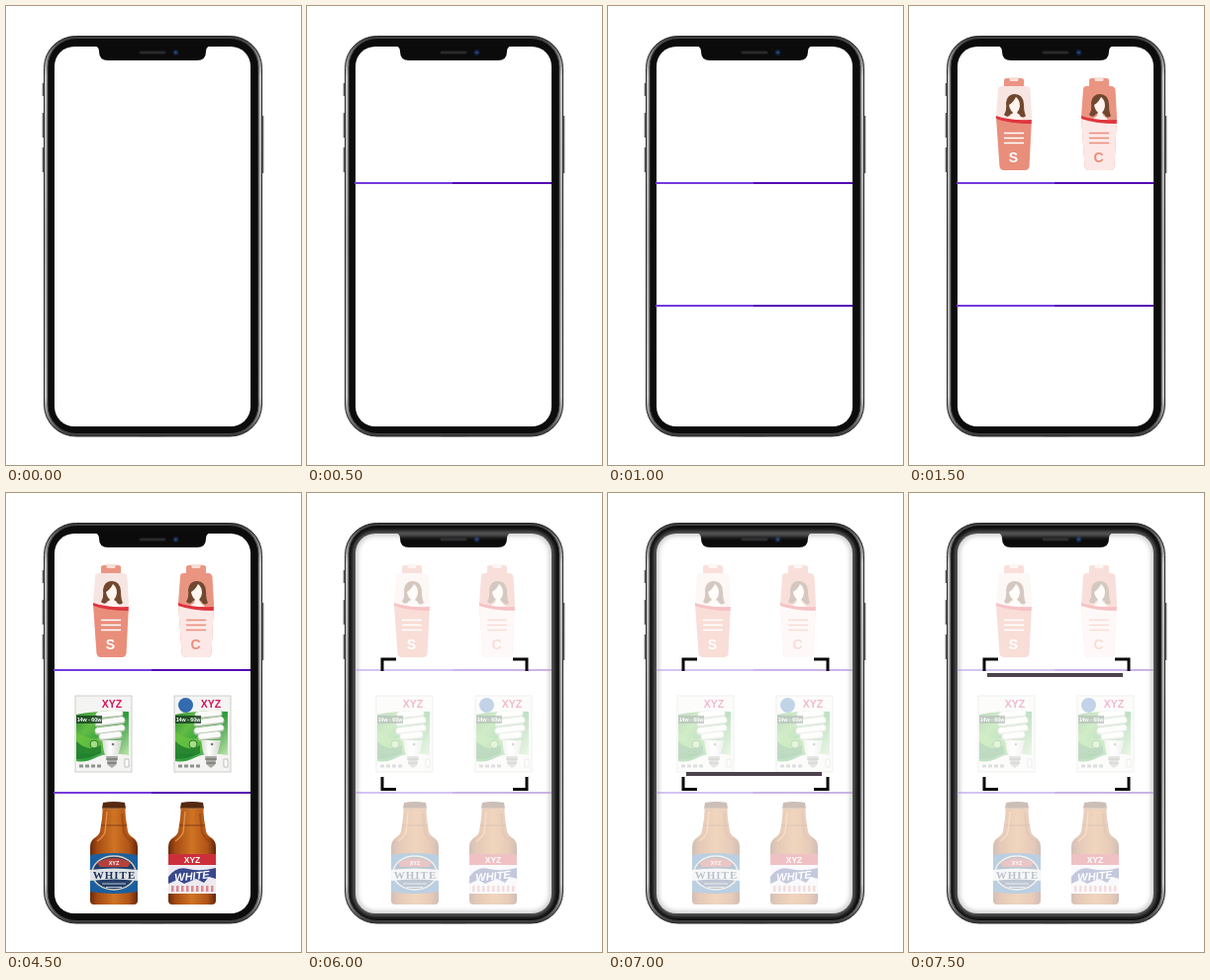
Write an HTML page that moves like this. It is 298x464 px and loops after 8 s.

```html
<!DOCTYPE html>
<html lang="en">
<head>
<meta charset="utf-8">
<style>
html, body { margin: 0; width: 100%; height: 100%; overflow: hidden; background: #fff; }
svg { display: block; width: 100vw; height: 100vh; }
text { font-family: "Liberation Sans", Arial, sans-serif; text-anchor: middle; }
.serif { font-family: "Liberation Serif", "Noto Serif", serif; font-weight: 700; }
</style>
</head>
<body>
<svg viewBox="0 0 298 464">
  <defs>
    <linearGradient id="rim" x2="0" y2="1">
      <stop stop-color="#333"/><stop offset=".04" stop-color="#777"/>
      <stop offset=".1" stop-color="#c4c4c4"/><stop offset=".5" stop-color="#aaa"/>
      <stop offset=".9" stop-color="#c4c4c4"/><stop offset=".96" stop-color="#777"/>
      <stop offset="1" stop-color="#333"/>
    </linearGradient>
    <linearGradient id="leaf" x2="1" y2=".8">
      <stop stop-color="#2f8a35"/><stop offset=".3" stop-color="#62bd45"/>
      <stop offset=".6" stop-color="#2c9a38"/><stop offset="1" stop-color="#b5dfa4"/>
    </linearGradient>
    <linearGradient id="glass">
      <stop stop-color="#6a2b0c"/><stop offset=".15" stop-color="#a54a12"/>
      <stop offset=".5" stop-color="#cf7424"/><stop offset=".82" stop-color="#b05316"/>
      <stop offset="1" stop-color="#64280b"/>
    </linearGradient>
    <linearGradient id="tube">
      <stop stop-color="#d5dccf"/><stop offset=".4" stop-color="#fff"/><stop offset="1" stop-color="#d0d5cb"/>
    </linearGradient>
    <filter id="soft" x="-10%" y="-10%" width="120%" height="120%"><feGaussianBlur stdDeviation="2.5"/></filter>
    <clipPath id="flask"><path d="M2 12Q2 9 6 9H30Q34 9 34.500 13L36 40L33.500 90Q33 94 29 94H8Q4 94 3.500 90L0 40Z"/></clipPath>
    <clipPath id="beerShape"><path id="beerPath" d="M13 3H35L36 17L38 30Q39 34 44 37Q48 40 48 46V100Q48 104 44 104H4Q0 104 0 100V46Q0 40 4 37Q9 34 10 30L12 17Z"/></clipPath>

    <g id="woman">
      <path d="M8 38Q11 33 10 26Q11 17 19 17Q27 17 28 27Q28 35 30 39Q26 43 23 37H15Q12 42 8 38Z" fill="#70482f"/>
      <path d="M13 28Q17 26 20 20Q24 23 24 29Q23 36 19 36Q14 35 13 28Z" fill="#fff5ee"/>
      <path d="M17 34H21L22 38L27 43H11L16 39Z" fill="#fff5ee"/>
    </g>

    <g id="bulb">
      <rect width="57" height="77" fill="#f4f4f2" stroke="#bbbcb8" stroke-width=".7"/>
      <path d="M1 19Q23 14 54 16V60Q34 56 22 62T1 66Z" fill="url(#leaf)"/>
      <path d="M1 36Q17 48 30 40V55Q15 62 1 57Z" fill="#69c440" opacity=".7"/>
      <path d="M1 46Q14 58 26 50V58Q13 64 1 64Z" fill="#1c7a2c" opacity=".8"/>
      <circle cx="19" cy="49" r="4" fill="#a9dc85" stroke="#287f31"/>
      <path d="M24 20L45 18M23 28L47 25M23 36L47 33M27 42L44 40" stroke="#b9c4b3" stroke-width="7" stroke-linecap="round"/>
      <path d="M24 19L45 17M23 27L47 24M23 35L47 32M27 41L44 39" stroke="#fbfcf9" stroke-width="5.500" stroke-linecap="round"/>
      <path d="M27 45H47L44 58Q42 61 36 61Q30 61 29 57Z" fill="url(#tube)"/>
      <path d="M31 61H43L41 70L37 73L33 70Z" fill="#a9aaa5"/>
      <path d="M31 64H43M32 68H42" stroke="#62655f" stroke-width="1.200"/>
      <circle cx="38" cy="49" r="1.300" fill="#777"/>
      <rect x="1" y="20" width="26" height="8" fill="#173d20" opacity=".8"/>
      <text x="14" y="26" font-size="5.300" font-weight="700" fill="#fff">14w - 60w</text>
      <path d="M4 71H27" stroke="#8b938d" stroke-width="3" stroke-dasharray="4 2"/>
      <path d="M50 64H54V72H50Z" fill="#fff" stroke="#a4aba5" stroke-width=".7"/>
      <text x="37" y="12" font-size="10.500" font-weight="700" fill="#d2145c">XYZ</text>
    </g>

    <g id="beer">
      <use href="#beerPath" fill="url(#glass)"/>
      <path d="M13 1Q24 -1 35 1L36 7H12Z" fill="#54290f"/>
      <path d="M12 7H36" stroke="#b87a45"/>
      <path d="M11 24H37" stroke="#6b2d0e" opacity=".7"/>
      <path d="M17 10L15 31Q13 36 7 40" fill="none" stroke="#eda45a" stroke-width="1.500" opacity=".7"/>
      <path d="M32 12L34 31Q36 36 41 40" fill="none" stroke="#8b3b0b" stroke-width="2" opacity=".5"/>
    </g>
  </defs>

  <g id="phone">
    <path d="M37.500 78V91M37.500 108V133M37.500 143V168M259.500 111V169" stroke="#686868" stroke-width="1.700"/>
    <rect x="38.500" y="30.500" width="220" height="404.500" rx="32" fill="url(#rim)" stroke="#292929"/>
    <rect x="42" y="32.500" width="213" height="400" rx="29" fill="#0c0c0c" stroke="#444"/>
    <rect x="49" y="41" width="198" height="384" rx="20" fill="#fff"/>
    <path d="M89 40H207Q202 41 202 46Q202 55 193 55H103Q94 55 94 46Q94 41 89 40Z" fill="#0b0b0c"/>
    <path d="M136 47H160" stroke="#29292b" stroke-width="3" stroke-linecap="round"/>
    <circle cx="171.500" cy="47" r="3" fill="#13213c"/><circle cx="171.500" cy="47" r="1.300" fill="#284c86"/>
    <path d="M136 435.500H160" stroke="#888"/>
  </g>
  <g id="goods">
    <g id="shampoos"></g>
    <g id="bulbs">
      <use href="#bulb" x="70" y="205"/>
      <use href="#bulb" x="170" y="205"/>
      <circle cx="181.500" cy="214.500" r="7.500" fill="#326bb0"/>
    </g>
    <g id="beers">
      <g transform="translate(85 312)">
        <use href="#beer"/>
        <g clip-path="url(#beerShape)">
          <path d="M0 54Q24 50 48 54V91Q24 95 0 91Z" fill="#1b5f9f"/>
          <ellipse cx="24" cy="72" rx="22" ry="17" fill="#24406b" stroke="#d9d3bd" stroke-width="1.500"/>
          <path d="M7 62Q24 52 41 62L38 66H10Z" fill="#b5413c"/>
          <text x="24" y="64" font-size="5.500" font-weight="700" fill="#fff">XYZ</text>
          <path d="M0 69Q24 66 48 69V80Q24 77 0 80Z" fill="#dfe3e5"/>
          <text class="serif" x="24.500" y="77.500" font-size="11" letter-spacing="1" fill="#1c3157">WHITE</text>
          <path d="M12 83H36M16 86.500H32" stroke="#b9c2cb"/>
        </g>
      </g>
      <g transform="translate(164 312)">
        <use href="#beer"/>
        <g clip-path="url(#beerShape)">
          <path d="M0 53H48V93H0Z" fill="#eeeaf0"/>
          <path d="M0 53H48V64H0Z" fill="#cc2f3a"/>
          <text x="24" y="62" font-size="8.500" font-weight="700" fill="#fff">XYZ</text>
          <path d="M0 76Q8 65 20 68T48 67V78L41 76L36 82L28 78L16 83L9 79L0 83Z" fill="#38488c"/>
          <text x="24" y="79" font-size="11" font-weight="700" font-style="italic" fill="#fff" transform="rotate(-5 24 76)">WHITE</text>
          <path d="M3 88H46" stroke="#d98a90" stroke-width="6" stroke-dasharray="2.500 2.500"/>
        </g>
      </g>
    </g>
    <g stroke-width="2">
      <g id="shelf1"><path d="M48 179H148" stroke="#743bdc"/><path d="M147 179H247" stroke="#5608b4"/></g>
      <g id="shelf2"><path d="M48 303H148" stroke="#743bdc"/><path d="M147 303H247" stroke="#5608b4"/></g>
    </g>
  </g>
  <rect id="glow" x="49" y="41" width="198" height="384" rx="20" fill="none" stroke="#aaa" stroke-width="3" filter="url(#soft)"/>
  <path id="corners" d="M76 180V168H90M208 168H222V180M76 287V299.500H90M208 299.500H222V287" fill="none" stroke="#080808" stroke-width="3"/>
  <rect id="bar" x="79" width="137" height="4" fill="#4c434d"/>
</svg>
<script>
const LOOP = 8000;
const el = id => document.getElementById(id);
const show = (id, on) => el(id).setAttribute('visibility', on ? 'visible' : 'hidden');

function shampoo(x, letter, top, body, ink) {
  return `<g transform="translate(${x} 72)">
    <path d="M8 3Q8 1 11 1H25Q28 1 28 3V10H8Z" fill="#ea9582"/>
    <path d="M13 0H23L22 4H14Z" fill="#f8dfd6"/>
    <g clip-path="url(#flask)">
      <path d="M0 8H37V95H0Z" fill="${top}"/>
      <use href="#woman"/>
      <path d="M0 41Q18 43 37 46V95H0Z" fill="${body}"/>
      <path d="M0 39Q12 44 37 43V47Q14 47 0 42Z" fill="#df343d"/>
    </g>
    <path d="M8 56.500H28M8 61.500H28M8 66.500H28" stroke="${ink}" stroke-width="1.700"/>
    <text x="17.500" y="86" font-size="14" font-weight="700" fill="${ink}">${letter}</text>
  </g>`;
}

el('shampoos').innerHTML =
  shampoo(88, 'S', '#f7e5e2', '#e98e7b', '#fff') +
  shampoo(174, 'C', '#ea9582', '#fce9e7', '#e98e7b');

function draw(t) {
  const scan = t >= 6000;
  show('shelf1', t >= 500);
  show('shelf2', t >= 1000);
  show('shampoos', t >= 1500);
  show('bulbs', t >= 3000);
  show('beers', t >= 4500);
  show('corners', scan);
  show('glow', scan);
  show('bar', t >= 6500);
  el('goods').setAttribute('opacity', scan ? .3 : 1);
  el('bar').setAttribute('y', t >= 7000 && t < 7500 ? 282 : 182);
}

function tick(now) {
  draw(now % LOOP);
  requestAnimationFrame(tick);
}
draw(0);
requestAnimationFrame(tick);
</script>
</body>
</html>
```
